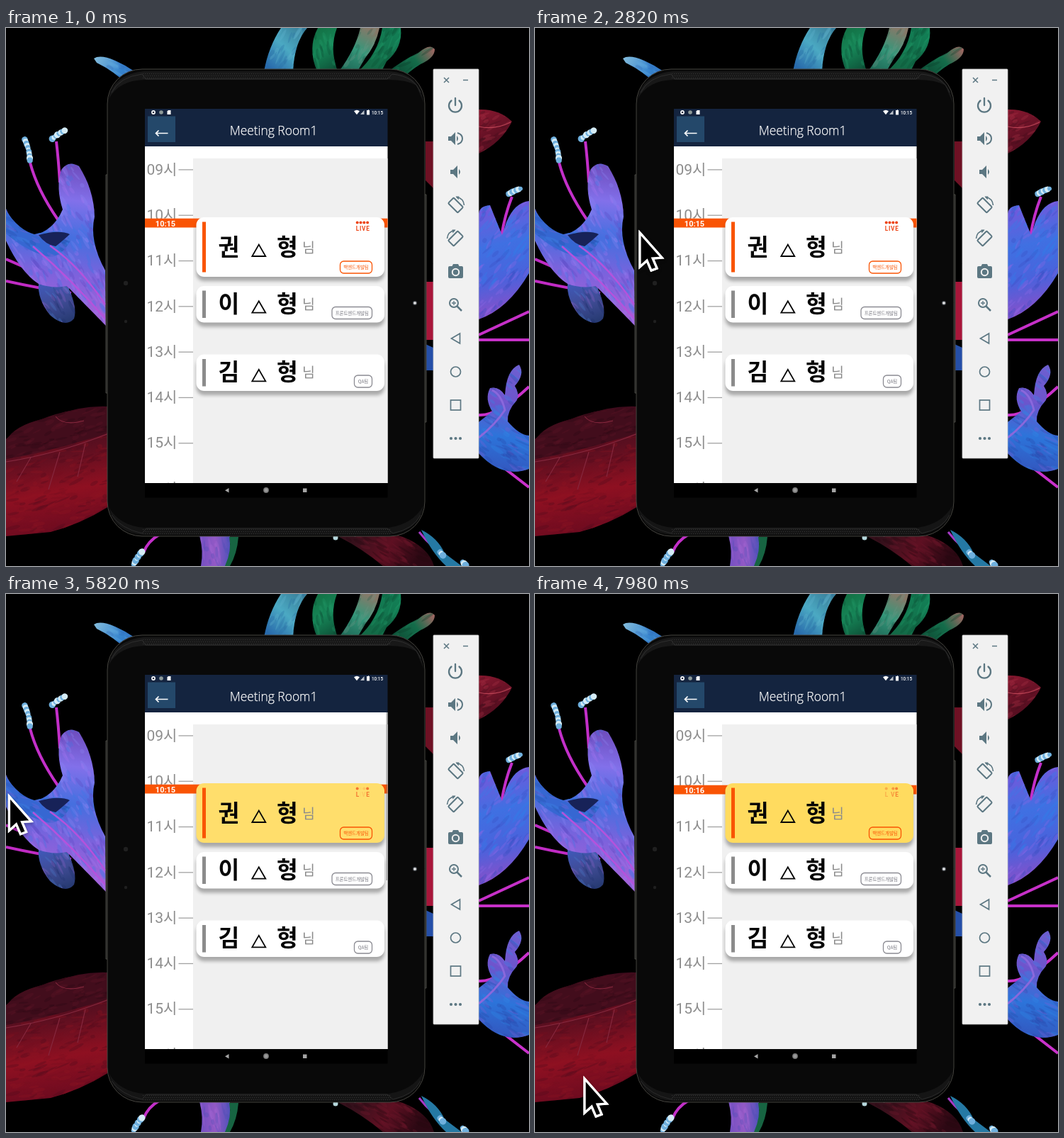
Write an HTML page with a canvas that moves like this. It is 738 px wide and 759 px high and loops after 8000 ms.

```html
<!DOCTYPE html>
<html lang="ko">
<head>
<meta charset="utf-8">
<title>Meeting room tablet</title>
<style>
  html, body { margin: 0; width: 100%; height: 100%; overflow: hidden; background: #000; }
  canvas { display: block; }
</style>
</head>
<body>
<canvas id="stage" width="738" height="759"></canvas>
<script>
const W = 738, H = 759, LOOP = 8000, STEP = 60;
const LEAVE = 4140, RETURN = 5100, MINUTE = 7180, PULSE = 1400;
const ORANGE = '#f95404', ICON = '#5c7782';
const SANS = 'Roboto, "Noto Sans CJK KR", "Noto Sans CJK", sans-serif';
const KOREAN = '"Noto Sans CJK KR", "Noto Sans CJK", sans-serif';
const LIGHT = '"Open Sans", "Noto Sans CJK KR", "Noto Sans CJK", sans-serif';

const screenCtx = document.getElementById('stage').getContext('2d');
let g = screenCtx;

const clamp = v => Math.max(0, Math.min(1, v));

let seed = 7;
const rnd = () => (seed = seed * 16807 % 2147483647) / 2147483647;

function rect(x, y, w, h, color) {
  g.fillStyle = color;
  g.fillRect(x, y, w, h);
}

function round(x, y, w, h, r, fill, stroke, line = 1) {
  g.beginPath();
  g.roundRect(x, y, w, h, r);
  if (fill) { g.fillStyle = fill; g.fill(); }
  if (stroke) { g.strokeStyle = stroke; g.lineWidth = line; g.stroke(); }
}

function disc(x, y, r, fill, stroke, line = 1) {
  g.beginPath();
  g.arc(x, y, r, 0, 7);
  if (fill) { g.fillStyle = fill; g.fill(); }
  if (stroke) { g.strokeStyle = stroke; g.lineWidth = line; g.stroke(); }
}

function shape(d, fill, stroke, line = 1) {
  const p = new Path2D(d);
  if (fill) { g.fillStyle = fill; g.fill(p); }
  if (stroke) { g.strokeStyle = stroke; g.lineWidth = line; g.stroke(p); }
}

function text(s, x, y, font, color, align = 'left') {
  g.font = font;
  g.fillStyle = color;
  g.textAlign = align;
  g.fillText(s, x, y);
}

function at(x, y, draw, angle = 0) {
  g.save();
  g.translate(x, y);
  g.rotate(angle);
  draw();
  g.restore();
}

function fade(x0, y0, x1, y1, ...colors) {
  const f = g.createLinearGradient(x0, y0, x1, y1);
  colors.forEach((c, i) => f.addColorStop(i / (colors.length - 1), c));
  return f;
}

// ---------- wallpaper ----------
// A filled petal with soft streaks of related tints along the given angle.
function petal(d, fill, box, angle, ...tints) {
  const [x, y, w, h] = box;
  shape(d, fill);
  g.save();
  g.clip(new Path2D(d));
  g.globalAlpha = .3;
  for (let i = 0; i < w * h / 90; i++) {
    g.fillStyle = tints[i % tints.length];
    g.beginPath();
    g.ellipse(x + rnd() * w, y + rnd() * h, 3 + rnd() * 9, 1 + rnd() * 2, angle + rnd() * .5 - .25, 0, 7);
    g.fill();
  }
  g.restore();
}

function anther(x, y, length, angle) {
  at(x, y, () => {
    for (let i = 0; i <= length; i += 3) {
      disc(i - length / 2, Math.sin(i * 2) * 2, 3 + rnd() * 2, i % 2 ? '#d5ecf6' : '#6fb0de');
    }
  }, angle);
}

function stamen(d, ...tip) {
  shape(d, null, '#c32fc9', 4);
  anther(...tip);
}

function leftFlower() {
  shape('M0 326Q45 345 90 366M0 357Q45 367 92 374', null, '#c02bc4', 4);
  stamen('M34 190Q44 228 73 270', 30, 173, 32, 1.35);
  stamen('M71 160Q74 185 76 218', 75, 151, 22, -.5);
  petal('M46 360Q66 348 88 366Q101 395 96 410Q84 424 62 405Q44 382 46 360Z',
    fade(60, 360, 80, 415, '#3f58b6', '#404c96', '#283b74'), [44, 350, 56, 72], .9, '#8a62c4', '#20306a', '#4a7acb');
  petal('M0 255Q8 275 36 293Q66 288 80 256Q70 225 78 200Q88 186 103 195Q124 228 125 266Q117 300 140 342' +
    'L141 420L86 364Q66 368 46 361Q20 344 0 300Z',
    fade(95, 190, 70, 400, '#6d4bbb', '#8270ea', '#456fdf', '#7e62dc', '#a263d9'),
    [0, 190, 142, 230], 1.1, '#3b78e4', '#a274ee', '#5a48c0', '#8a86f2');
  petal('M40 291Q82 280 91 300Q74 330 52 320Q30 315 0 290L0 258Q18 285 40 291Z', '#3667d2',
    [0, 258, 92, 66], .5, '#2450a8', '#7c62d6', '#3c88e4');
  shape('M46 292Q75 284 90 291Q78 302 70 308Q56 306 46 292Z', '#172258');
  shape('M38 308Q92 354 140 410M62 307Q104 336 140 390', null, '#b552dc', 2.5);
}

function rightFlowers() {
  petal('M667 115Q696 114 714 132Q699 162 667 177Z', fade(670, 120, 700, 170, '#84172e', '#4b0c1d'),
    [667, 115, 48, 62], -.5, '#a83446', '#42101c');
  shape('M667 139Q690 144 712 133', null, '#bb4254', 1.2);
  shape('M592 160H603V226L592 215Z', '#6e1124');
  shape('M592 358H603V440H592Z', '#a8163a');
  shape('M592 446L603 451V483H592Z', '#254fa8');
  stamen('M714 238Q704 263 699 294', 719, 231, 20, -.3);
  shape('M667 440H738M667 433L738 400', null, '#c630c8', 4);
  petal('M738 244Q718 246 706 274L700 292L683 250Q668 251 667 262V411Q708 397 738 346Z',
    fade(680, 260, 715, 400, '#6c5bdc', '#3f70e2', '#4a62dc', '#8a4fc9'),
    [667, 244, 71, 166], -.9, '#2f7ee8', '#8f66e4', '#3a4cc0');
  shape('M667 546Q693 548 738 506M667 593L738 648', null, '#c931cb', 4);
  petal('M667 556L686 541Q675 523 683 508Q696 505 704 518Q706 482 724 475Q733 488 718 505Q725 516 721 525' +
    'Q707 540 708 555Q724 574 738 575V622Q700 636 667 600Z',
    fade(715, 480, 690, 625, '#6c5fd0', '#6e54cc', '#2c74da', '#3356be'),
    [667, 475, 71, 155], .6, '#2c88e4', '#7a5cd4', '#2a46a8');
  shape('M686 511Q699 517 704 539Q690 560 667 578', null, '#8a68dc', 3);
}

function topPetals() {
  petal('M124 43Q133 37 154 46Q181 58 201 78L174 82Q153 61 128 49Z',
    fade(124, 40, 200, 80, '#86bedd', '#3684cd', '#325db1'), [124, 38, 76, 42], .5, '#60a8dc', '#2f68b8');
  petal('M388 0H425Q407 20 405 61H364Q371 25 388 0Z',
    fade(370, 55, 418, 0, '#286aab', '#4ba9c3', '#397f99'), [364, 0, 60, 60], -1.1, '#62b4cc', '#2a6ea4');
  petal('M440 0H467Q456 29 468 61H439Q425 28 440 0Z',
    fade(430, 0, 465, 60, '#126d41', '#168557', '#0d5037'), [430, 0, 40, 60], 1.4, '#249a66', '#0c4a34');
  petal('M500 0H527Q522 24 507 42L496 61H470Q493 30 500 0Z',
    fade(510, 0, 480, 60, '#877868', '#35977a', '#1e6b58'), [470, 0, 58, 60], -1, '#6f9484', '#215c4e');
  petal('M531 0H557Q560 28 537 47L529 63H495Q525 37 531 0Z',
    fade(550, 0, 510, 60, '#128056', '#136845'), [495, 0, 65, 62], -1, '#1f9a68', '#0c4c34');
  petal('M605 30Q605 42 585 51Q568 61 558 74L536 64Q560 45 582 35Q598 21 605 30Z',
    fade(605, 25, 550, 65, '#b36666', '#146c4a', '#0d4d35'), [536, 25, 70, 48], -.6, '#1b7c58', '#0b3c2a');
}

function bottomLeaves() {
  petal('M0 580Q24 557 65 548Q105 532 145 534V675Q105 700 63 711L0 717Z',
    fade(45, 547, 75, 710, '#3d0b1c', '#5c0f20', '#8e1021', '#6d0b20'),
    [0, 534, 145, 183], -.25, '#8e1424', '#4c0c1c', '#74101f');
  petal('M0 608Q65 597 145 571L145 536Q90 535 50 552Q12 561 0 582Z', '#420d1c',
    [0, 535, 145, 73], -.3, '#5e1626', '#2a0812');
  shape('M0 612Q72 601 145 572M70 548Q81 562 110 554M35 606L15 640M76 598L60 651M112 586L101 633', null, '#86283e', 1.1);
  stamen('M216 715Q200 724 194 740', 187, 748, 22, -.9);
  petal('M273 716H316V759H275Q279 738 273 716Z', fade(274, 0, 316, 0, '#7350c2', '#9259c5', '#5252ba'),
    [273, 716, 44, 43], 1.4, '#a868d4', '#4a4eb4');
  shape('M315 718H328Q326 742 316 759H309Q319 737 315 718Z', '#176442');
  petal('M470 718Q527 708 560 718Q596 732 604 759H532Q502 734 470 718Z',
    fade(500, 710, 575, 759, '#35101b', '#5e1022', '#2c0813'), [470, 710, 134, 49], .5, '#701a2c', '#24080f');
  shape('M583 711Q600 733 624 747', null, '#a739c6', 3);
  shape('M586 708Q609 719 619 741L643 759H621Q601 741 586 708Z', '#2579a4');
  anther(614, 742, 6, 1);
  anther(646, 756, 6, 1);
  anther(488, 713, 10, .2);
  disc(465, 719, 3.5, '#b6d8dd');
}

// ---------- tablet and side panel ----------
function tablet() {
  shape('M143 207H141V515H143M591 235H593V556H591', '#202020', '#484842');
  round(143, 58, 448, 659, 49, '#090909', '#45443f');
  shape('M145 100Q151 66 194 61H540Q584 64 589 105L579 81Q566 73 539 73H195Q159 74 145 100Z', '#181818');
  shape('M145 676Q154 713 195 715H540Q584 709 589 674Q574 700 540 705H195Q160 702 145 676Z', '#151515');
  g.fillStyle = '#343434';
  for (let x = 193; x < 543; x += 3) {
    for (let row = 0; row < 3; row++) {
      g.fillRect(x + row % 2, 64 + row * 3, 1, 1);
      g.fillRect(x + row % 2, 707 + row * 3, 1, 1);
    }
  }
  shape('M149 91Q160 69 192 65L197 72H538L545 65Q576 68 585 91', null, '#353535', .8);
  shape('M149 687Q162 706 192 713L198 706H538L546 713Q575 707 585 687', null, '#303030', .8);
  disc(169, 360, 3.2, '#202020');
  disc(169, 414, 2.2, '#202020');
  disc(577, 388, 3, '#50545a');
  disc(577, 388, 1.8, '#f2f2f2');
}

function speaker(waves) {
  at(634, waves ? 156 : 203, () => {
    const dx = waves ? -1 : 2;
    shape(`M${dx - 9} -3h4l6 -6v18l-6 -6h-4Z`, ICON);
    shape(`M${dx + 3} -4q4 4 0 8Z`, ICON);
    if (waves) shape('M3 -8Q10 -6 10 0Q10 6 3 8', null, ICON, 2);
  });
}

function rotator(y, dir) {
  at(634.5, y, () => {
    g.scale(dir, 1);
    at(0, 0, () => round(-5.5, -9.5, 11, 19, 1.5, null, ICON, 2), -Math.PI / 4);
    shape('M1 -11.5Q11 -10 12 0', null, ICON, 1.6);
    shape('M0 -12.5H5L4 -7.5Z', ICON);
  });
}

function panel() {
  round(603, 58, 64, 549, 1, '#f1f1f1', '#c9c9c9', .8);
  shape('M618 70L625 77M625 70L618 77M645 73.5H652', null, ICON, 1.5);
  g.lineCap = 'round';
  shape('M628.5 102.5A9 9 0 1 0 639.5 102.5M634 99V109', null, ICON, 2.3);
  g.lineCap = 'butt';
  speaker(true);
  speaker(false);
  rotator(250, 1);
  rotator(297, -1);
  round(624, 336, 21, 17, 2, ICON);
  shape('M629 337L631 333H638L640 337Z', ICON);
  disc(634.5, 344.5, 4.7, ICON, '#f1f1f1', 2);
  disc(632, 388, 6, null, ICON, 2);
  shape('M636.5 392.5L643 399', null, ICON, 2.5);
  shape('M629 388H635M632 385V391', null, ICON, 1.3);
  shape('M640.5 431V445L628.5 438Z', null, ICON, 1.7);
  disc(634.5, 485, 7, null, ICON, 1.7);
  g.strokeRect(627.5, 525, 14, 14);
  for (const x of [628, 634.5, 641]) disc(x, 579, 2.1, ICON);
}

function makeBackdrop() {
  const c = document.createElement('canvas');
  c.width = W;
  c.height = H;
  g = c.getContext('2d');
  rect(0, 0, W, H, '#000');
  topPetals();
  leftFlower();
  rightFlowers();
  bottomLeaves();
  tablet();
  panel();
  g = screenCtx;
  return c;
}

// ---------- app screens ----------
function systemBars() {
  rect(196, 114, 342.5, 53, '#14243f');
  disc(208, 119, 2.1, null, '#fff', 1.6);
  disc(219, 119, 2.8, '#8e9a99');
  shape('M229 116H232.5V122H227.5V117.5Z', '#fff');
  shape('M491 117.3Q495 114 499 117.3L495 122.3Z', '#fff');
  shape('M505.5 116V122H500Z', '#b9bfc8');
  shape('M510 116H511V115.3H512V116H513V122.5H509V116Z', '#fff');
  text('10:15', 532, 121.5, `500 6.3px ${SANS}`, '#fff', 'right');
  rect(196, 642, 342.5, 20.5, '#000');
  shape('M314.5 649V655.5L309 652.2Z', '#a5a5a5');
  disc(367, 652, 3.2, '#999', '#777', 1.4);
  rect(419, 649.5, 5.5, 5.5, '#a5a5a5');
}

function title(s) {
  text(s, 377.5, 151, `300 17.4px ${LIGHT}`, '#fff', 'center');
  g.strokeStyle = '#fff';
  g.lineWidth = .25;
  g.strokeText(s, 377.5, 151);
}

function shadowCard(x, y, w, h, r, color, drop, blur, alpha) {
  g.save();
  g.shadowColor = `rgba(0,0,0,${alpha})`;
  g.shadowOffsetY = drop;
  g.shadowBlur = blur;
  round(x, y, w, h, r, color);
  g.restore();
}

function liveBadge(p, glow) {
  const letters = [['L', 493.7], ['I', 499.1], ['V', 502], ['E', 508.3]];
  letters.forEach(([ch, x], i) => {
    const gap = Math.abs(p - .5 - i * .08);
    g.globalAlpha = clamp((gap - .03) / .08) * (1 - .45 * clamp((glow - .6) / .4));
    disc(495.7 + i * 4.8, 274.4, 2, '#ed4517');
    text(ch, x, 285.5, `700 8.2px ${SANS}`, '#ed4517');
  });
  g.globalAlpha = 1;
}

function booking(surname, team, y, h, mid, tagX, tagY, fill, accent) {
  shadowCard(268.5, y, 265.5, h, 11, fill, 6, 5, .3);
  rect(277, y + 6.5, 5, h - 13, accent);
  const base = mid + 11;
  text(surname, 314.5, base, `700 32.4px ${KOREAN}`, '#050505', 'center');
  shape(`M347.3 ${mid + 12}H366.3L356.8 ${mid - 4.5}Z`, null, '#050505', 1.8);
  text('형', 397, base, `700 32.4px ${KOREAN}`, '#050505', 'center');
  text('님', 427, mid + 7, `400 19.5px ${KOREAN}`, '#8b8b8b', 'center');
  const live = accent === ORANGE;
  round(tagX, tagY, 516.5 - tagX, 17, 5, null, live ? ORANGE : '#8b8b92', 1.3);
  text(team, (tagX + 516.5) / 2, tagY + 11, `400 6.4px ${KOREAN}`, live ? ORANGE : '#73737c', 'center');
}

function schedule(t) {
  rect(196, 167, 342.5, 475, '#fff');
  rect(264, 184, 274.5, 458, '#f0f0f0');
  g.save();
  g.beginPath();
  g.rect(196, 167, 342, 475);
  g.clip();
  for (let i = 0; i < 8; i++) {
    const y = 199.8 + i * 64.3;
    text(String(9 + i).padStart(2, '0') + '시', 198.5, y + 6.8, `400 21px ${SANS}`, '#8d8d8d');
    rect(243.5, y - .5, 20.5, 1.3, '#a2a2a2');
  }
  g.restore();

  const late = t >= MINUTE;
  const barY = late ? 269.7 : 268.7;
  rect(196, barY, 342.5, 12.8, ORANGE);
  text(late ? '10:16' : '10:15', 225, barY + 11.3, `700 11px ${SANS}`, '#fff', 'center');

  const start = t < LEAVE ? 0 : late ? MINUTE : 4960;
  const p = (t - start) / PULSE % 1;
  const glow = (1 - Math.cos(p * 2 * Math.PI)) / 2;
  const fill = `rgb(255,${Math.round(255 - 38 * glow)},${Math.round(255 - 168 * glow)})`;
  booking('권', '백엔드개발팀', 267, 84, 310, 471.5, 329, fill, ORANGE);
  liveBadge(p, glow);
  booking('이', '프론트엔드개발팀', 364, 51.5, 389.7, 460, 393.5, '#fff', '#8b8b8b');
  booking('김', 'QA팀', 460.5, 51.5, 486.3, 491.5, 490, '#fff', '#8b8b8b');
  if (t >= RETURN && t < 6720) rect(536.5, 167, 1.5, 237, 'rgba(110,110,110,.55)');

  systemBars();
  rect(200, 124.5, 39, 36.5, '#24486a');
  shape('M228.5 148.5H211.5M215.5 144.5L211.5 148.5L215.5 152.5', null, '#fff', 1.7);
  title('Meeting Room1');
}

function roomList() {
  rect(196, 167, 342.5, 475, '#d3d3d3');
  [1, 3, 2].forEach((room, i) => {
    const y = 180 + i * 68.6;
    shadowCard(205, y, 325, 51, 10, '#f2f2f2', 1, 3, .28);
    text(`QZE Meeting Room${room}`, 286, y + 30.6, `700 12.8px ${SANS}`, '#6c6464');
    shape(`M507.8 ${y + 20.7}L513 ${y + 26.2}L507.8 ${y + 31.7}`, null, '#dc5121', 2);
  });
  systemBars();
  at(-10, 0, () => title('QZE 면접실'));
}

// ---------- pointer ----------
const trail = [
  [1900, 40, 775], [2340, 95, 470], [2820, 148, 289], [3600, 226, 150], [4200, 226, 150],
  [4920, 213, 236.5], [5100, 218, 215], [5760, 5, 285], [6360, -13, 308], [7080, 8, 520], [7980, 70, 684]
];

function pointer(t) {
  const i = trail.findIndex(k => k[0] > t);
  if (i === 0) return;
  const b = trail[i < 0 ? trail.length - 1 : i];
  const a = i < 0 ? b : trail[i - 1];
  const u = a === b ? 0 : (t - a[0]) / (b[0] - a[0]);
  const e = u * u * (3 - 2 * u);
  at(a[1] + (b[1] - a[1]) * e, a[2] + (b[2] - a[2]) * e, () => {
    const d = 'M0 0V48L10 39L16 53L24 50L18 36L31 35Z';
    g.shadowColor = 'rgba(0,0,0,.4)';
    g.shadowBlur = 5;
    g.shadowOffsetY = 2;
    shape(d, null, '#fff', 3.4);
    g.shadowColor = 'transparent';
    shape(d, '#000', '#fff', 3.2);
  });
}

const backdrop = makeBackdrop();

function frame() {
  const t = Math.floor(performance.now() % LOOP / STEP) * STEP;
  g.drawImage(backdrop, 0, 0);
  if (t < LEAVE || t >= RETURN) schedule(t);
  else roomList();
  pointer(t);
  requestAnimationFrame(frame);
}
frame();
</script>
</body>
</html>
```
